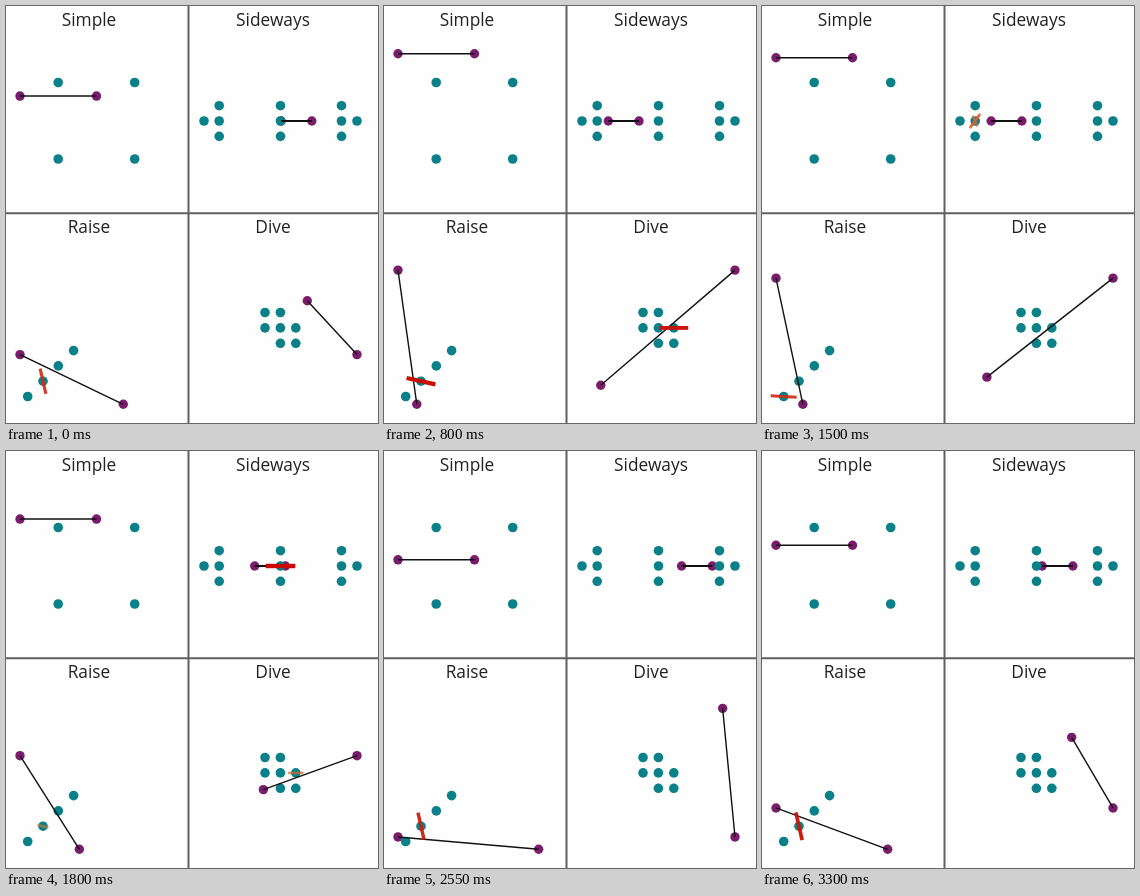
These frames come from a looping animation (372 px wide and 417 px high, 3350 ms). An HTML page:

```html
<!DOCTYPE html>
<html lang="en">
<head>
<meta charset="utf-8">
<title>Moving segments</title>
<style>
  html, body { margin: 0; width: 100%; height: 100%; overflow: hidden; background: #fefefe; }
  svg { display: block; }
  text { font: 17.3px "Open Sans", "Noto Sans", sans-serif; text-anchor: middle; fill: #222; }
</style>
</head>
<body>
<svg id="stage" width="372" height="417" viewBox="0 0 372 417"></svg>
<script>
const LOOP = 3350, STEP = 50, FADE = 300;
const stage = document.getElementById('stage');

function add(name, attrs, parent = stage) {
  const el = document.createElementNS('http://www.w3.org/2000/svg', name);
  set(el, attrs);
  return parent.appendChild(el);
}
function set(el, attrs) {
  for (const key in attrs) el.setAttribute(key, attrs[key]);
}
const mix = (a, b, k) => a + (b - a) * k;

// Progress of every segment: up, rest, down, rest, up again.
const KEYS = [[0, .325], [978, 1], [1252, 1], [2664, 0], [2912, 0], [LOOP, .305]];
function progress(t) {
  const i = KEYS.findIndex(key => key[0] > t);
  const [t0, p0] = KEYS[i - 1], [t1, p1] = KEYS[i];
  return mix(p0, p1, (t - t0) / (t1 - t0));
}
const rising = p => p < .315 ? 2912 + p * 438 / .305 : (p - .325) * 978 / .675;
const falling = p => 1252 + (1 - p) * 1412;

const SIZE = 153;
const scenes = [
  {
    title: 'Simple', at: [83, 20], width: 1.4,
    dots: [[52.2, 76.5], [128.7, 76.5], [52.2, 153], [128.7, 153]],
    ends: p => [14, 115 - 76.7 * p, 90.5, 115 - 76.7 * p]
  },
  {
    title: 'Sideways', at: [267, 20], width: 2,
    dots: [[198, 115], [351, 115],
      ...[213.2, 274.5, 335.5].flatMap(x => [99.7, 115, 130.3].map(y => [x, y]))],
    ends: p => [305 - 92 * p, 115, 335.7 - 92 * p, 115]
  },
  {
    title: 'Raise', at: [83, 227], width: 1.4,
    dots: [0, 1, 2, 3].map(k => [21.7 + 15.3 * k, 390.5 - 15.3 * k]),
    ends: p => [14, 398.3 - SIZE * p, 14 + SIZE * (1 - p), 398.3]
  },
  {
    title: 'Dive', at: [267, 227], width: 1.4,
    dots: [[0, 0], [1, 0], [0, 1], [1, 1], [2, 1], [1, 2], [2, 2]]
      .map(([c, r]) => [259 + 15.4 * c, 306.5 + 15.4 * r]),
    ends: p => [351 - SIZE * p, 245 + SIZE * p, 351, 398.3 - SIZE * p]
  }
];

// Each hit leaves a dash along the direction in which the segment was moving.
const hits = [];
function hit(time, x, y, dx, dy, red = 200) {
  hits.push({ time, x, y, red, angle: Math.atan2(dy, dx) * 180 / Math.PI });
}
function bothWays(p, ...rest) {
  hit(rising(p), ...rest);
  hit(falling(p), ...rest);
}
bothWays(.5, 52.2, 76.5, 0, 1);
bothWays(1 / 3, 274.5, 115, 1, 0);
bothWays(2 / 3, 274.5, 115, 1, 0);
for (const [k, p] of [[0, .053], [0, .947], [1, .184], [1, .816]])
  bothWays(p, ...scenes[2].dots[k], p, 1 - p);
hit(rising(.54), ...scenes[2].dots[2], 1, 1);
hit(falling(.46), ...scenes[2].dots[2], 1, 1);
bothWays(.5, 274.4, 321.9, 1, -1);
bothWays(.5, 289.8, 321.9, .8, -.6);
bothWays(.8, 289.8, 321.9, 1, 0);
hit(1090, 274.4, 321.9, 1, 0, 240);

// A resting end keeps hitting its dot from scattered directions.
let seed = 7;
function random() {
  seed = (seed * 16807) % 2147483647;
  return seed / 2147483647;
}
function burst(from, to, x) {
  for (let t = from; t < to; t += 17) {
    const a = random() * Math.PI;
    hit(t, x, 115, Math.cos(a), Math.sin(a), 255);
  }
}
burst(978, 1252, 213);
burst(2664, 2912, 335.5);

add('path', { d: 'M182.5 0V417M0 207.2H372', stroke: '#606060', 'stroke-width': 2 });
for (const scene of scenes) {
  add('text', { x: scene.at[0], y: scene.at[1] }).textContent = scene.title;
  scene.tips = [0, 1].map(() => add('circle', { r: 4.7, fill: '#7a1c6c' }));
  for (const [cx, cy] of scene.dots) add('circle', { cx, cy, r: 4.8, fill: '#0a8088' });
  scene.line = add('line', { stroke: '#111', 'stroke-width': scene.width });
}
for (const h of hits)
  h.el = add('line', { transform: `translate(${h.x} ${h.y}) rotate(${h.angle})` });

function render(t) {
  const p = progress(t);
  for (const { ends, tips, line } of scenes) {
    const [x1, y1, x2, y2] = ends(p);
    set(line, { x1, y1, x2, y2 });
    set(tips[0], { cx: x1, cy: y1 });
    set(tips[1], { cx: x2, cy: y2 });
  }
  for (const h of hits) {
    const k = (t - h.time + LOOP) % LOOP / FADE;
    h.el.style.display = k < 1 ? '' : 'none';
    if (k >= 1) continue;
    const half = 15 * (1 - .7 * k ** 3), warm = k * k;
    set(h.el, {
      x1: -half, x2: half,
      'stroke-width': 2.5 + 3.5 * (1 - k) ** 2,
      stroke: `rgb(${mix(h.red, 215, warm)},${mix(0, 130, warm)},${mix(0, 60, warm)})`,
      'stroke-opacity': 1 - .4 * k ** 3
    });
  }
}

const start = performance.now();
function tick() {
  const t = (performance.now() - start) % LOOP;
  render(Math.floor(t / STEP) * STEP);
  requestAnimationFrame(tick);
}
tick();
</script>
</body>
</html>
```
